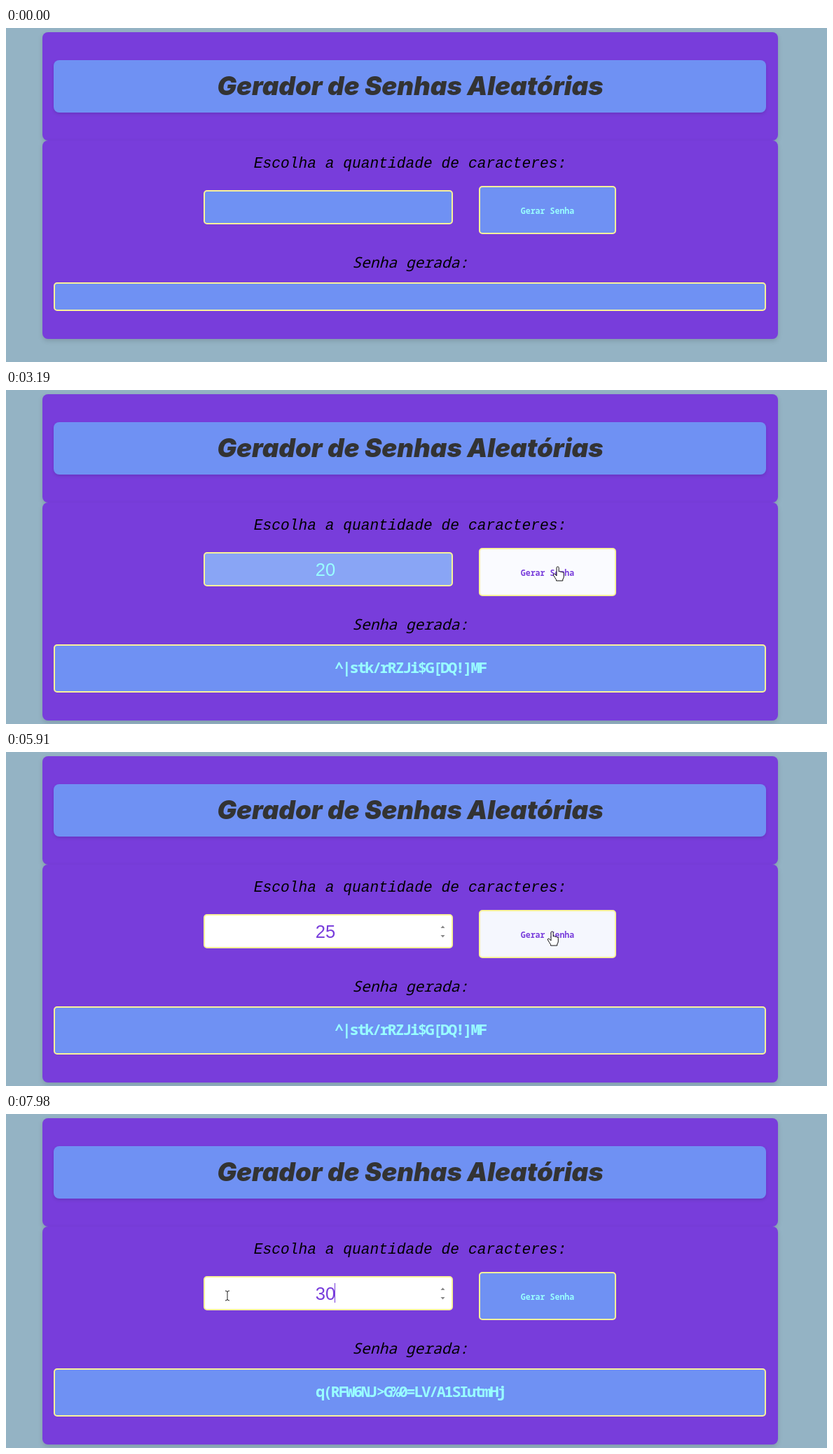
An HTML page that plays this animation: 1172 by 478 pixels, repeating every 8000 ms.

```html
<!DOCTYPE html>
<html lang="pt">
<head>
<meta charset="utf-8">
<title>Gerador de Senhas</title>
<style>
  html, body { margin: 0; width: 100%; height: 100%; overflow: hidden; background: #94b3c4; }
  svg { display: block; width: 1172px; height: 478px; }
  text { text-anchor: middle; white-space: pre; }
  .card { fill: #783ddb; filter: drop-shadow(0 3px 3px rgba(0, 0, 0, .13)); }
  .head { fill: #6f91f3; filter: drop-shadow(0 2px 2px rgba(0, 0, 0, .12)); }
  .box { stroke: #f8f29a; stroke-width: 2; }
  .title { font: italic 900 36.6px Inter, sans-serif; fill: #333; }
  .ask { font: italic 21.25px "Liberation Mono", monospace; }
  .out { font: italic 500 21.25px "Noto Sans Mono", monospace; }
  .label { font: 600 11.6px "Noto Sans Mono", monospace; }
  .num { font: 25.6px "Liberation Sans", Arial, sans-serif; }
  .pass { font: 700 22px "Noto Sans Mono", monospace; letter-spacing: -2.4px; fill: #9ff; }
</style>
</head>
<body>
<svg viewBox="0 0 1172 478">
  <rect class="card" x="52" y="6" width="1050" height="155" rx="8"/>
  <rect class="card" id="card" x="52" y="161" width="1050" height="284" rx="8"/>
  <rect class="head" x="68" y="46" width="1017" height="75" rx="8"/>
  <text class="title" x="577" y="96">Gerador de Senhas Aleatórias</text>
  <text class="ask" x="577" y="200">Escolha a quantidade de caracteres:</text>
  <text class="out" x="577" y="343">Senha gerada:</text>

  <rect class="box" id="input" x="283" y="233" width="354" height="47" rx="4"/>
  <rect id="sel" y="242" height="29" fill="#0078d7"/>
  <text class="num" x="456" y="266"><tspan id="plain"></tspan><tspan id="picked" fill="#fff"></tspan></text>
  <rect id="caret" y="242" width="1" height="28" fill="#783ddb"/>
  <g id="spin">
    <rect id="spinBox" x="619.5" y="242" width="8.5" height="29"/>
    <path d="M620.5 252l3-3.5 3 3.5zM620.5 262l3 3.5 3-3.5z" fill="#888"/>
  </g>

  <rect class="box" id="button" x="676" y="227" width="194" height="67" rx="4"/>
  <text class="label" id="label" x="773" y="265.5">Gerar Senha</text>

  <rect class="box" id="result" x="69" y="365" width="1015" height="39" rx="4" fill="#6f91f3"/>
  <text class="pass" id="pass" x="577" y="405"></text>

  <g id="cursor">
    <path id="arrow" d="M0 0V14.5l3.4-3.2 2.4 5.4 2.3-1-2.4-5.2h4.3z" fill="#fff" stroke="#111"/>
    <path id="hand" d="M-2 12V1.5a1.6 1.6 0 0 1 3.2 0V7q1.5-1 2.6.4 1.5-.8 2.5.5 2-.4 2 1.6v4.5q0 2-1.5 4v2H-2.5v-1.5q-2-3-4-6.5-.6-1.8 1-2 1.5.3 3.5 3z" fill="#fff" stroke="#111"/>
    <path id="beam" d="M-3-7q3 0 3 2 0-2 3-2M0-5V5M-3 7q3 0 3-2 0 2 3 2" fill="none"/>
  </g>
</svg>
<script>
const LOOP = 8000, TICK = 200 / 3, FADE = 300, BLINK = 520, ENTER = 120, DIGIT = 14.23;
const el = {};
document.querySelectorAll('[id]').forEach(n => el[n.id] = n);

const slowDown = u => 1 - (1 - u) ** 1.4;
const speedUp = u => u ** 3;
const START = [945, 437];
// pointer moves: begin, end, x, y, easing
const moves = [
  [ENTER, 660, 460, 255, slowDown],
  [923, 1176, 571, 284, slowDown],
  [2650, 2984, 788, 253, speedUp],
  [3520, 3960, 480, 268, slowDown],
  [3960, 4250, 378.5, 263, slowDown],
  [5570, 5850, 780, 257, slowDown],
  [6170, 6430, 480, 258, slowDown],
  [6430, 6700, 316, 260, slowDown]
];
const focus = [[660, 3000], [3960, 5930], [6430, Infinity]];
const hover = [[2934, 3657], [5690, 6257]];
const typed = [[0, ''], [2100, '2'], [2240, '20'], [4970, '2'], [5360, '25'], [7570, '3'], [7630, '30']];
const passwords = [[0, ''], [3120, '^|stk/rRZJi$G[DQ!]MF'], [6040, 'q(RFW6NJ>G%0=LV/A1SIutmHj']];

const clamp = (v, lo, hi) => Math.min(hi, Math.max(lo, v));
const spanAt = (spans, t) => spans.find(([a, b]) => t >= a && t < b);
const latest = (steps, t) => steps.filter(s => s[0] <= t).pop();
const ease = u => {
  const v = clamp(u, 0, 1) ** .65;
  return v * v * (3 - 2 * v);
};
const level = (spans, t) =>
  spans.reduce((sum, [a, b]) => sum + ease((t - a) / FADE) - ease((t - b) / FADE), 0);
const tint = k => `rgb(${[111, 145, 243].map(c => Math.round(c + (255 - c) * k))})`;
const set = (node, attrs) => { for (const k in attrs) node.setAttribute(k, attrs[k]); };
const show = (node, on) => node.style.display = on ? '' : 'none';

function pointAt(t) {
  let [x, y] = START;
  for (const [a, b, tx, ty, curve] of moves) {
    const k = curve(clamp((t - a) / (b - a), 0, 1));
    x += (tx - x) * k;
    y += (ty - y) * k;
  }
  return [x, y];
}

function drawPointer(t, x, y, hovered, focused, overInput) {
  show(el.cursor, t >= ENTER);
  set(el.cursor, { transform: `translate(${x} ${y})` });
  show(el.hand, hovered);
  show(el.beam, overInput && !hovered);
  show(el.arrow, !overInput && !hovered);
  set(el.beam, { stroke: focused ? '#222' : '#dfe8ff' });
}

function drawInput(t, x, focused, overInput) {
  const [keyTime, value] = latest(typed, t), n = value.length;
  const left = 456 - n * DIGIT / 2, right = 456 + n * DIGIT / 2;
  // dragging selects back from the end until the next key
  const dragging = focused && keyTime < focused[0];
  const from = dragging ? clamp(Math.round((x - left) / DIGIT), 0, n) : n;
  const blinkOn = focused && Math.floor((t - Math.max(keyTime, focused[0])) / BLINK) % 2 === 0;

  set(el.input, { fill: tint(level(focus, t)) });
  el.plain.textContent = value.slice(0, from);
  el.picked.textContent = value.slice(from);
  set(el.plain, { fill: focused ? '#783ddb' : '#9ff' });
  set(el.sel, { x: left + from * DIGIT, width: (n - from) * DIGIT });
  set(el.caret, { x: Math.floor(right - .4) + (n ? 0 : 1) });
  show(el.caret, blinkOn && from === n);
  show(el.spin, focused || overInput);
  set(el.spinBox, { fill: focused ? '#fff' : '#f4f5fa' });
}

function render(t) {
  const [x, y] = pointAt(t);
  const focused = spanAt(focus, t), hovered = !!spanAt(hover, t);
  const overInput = t >= ENTER && x > 282 && x < 638 && y > 232 && y < 281;
  drawPointer(t, x, y, hovered, focused, overInput);
  drawInput(t, x, focused, overInput);

  set(el.button, { fill: tint(level(hover, t)) });
  set(el.label, { fill: hovered ? '#783ddb' : '#9ff' });
  const pass = latest(passwords, t)[1], grow = pass ? 28 : 0;
  el.pass.textContent = pass;
  set(el.result, { height: 39 + grow });
  set(el.card, { height: 284 + grow });
}

function loop(now) {
  const t = now % LOOP;
  render(Math.max(0, Math.floor((t - 43) / TICK) * TICK + 51));
  requestAnimationFrame(loop);
}
render(0);
requestAnimationFrame(loop);
</script>
</body>
</html>
```
